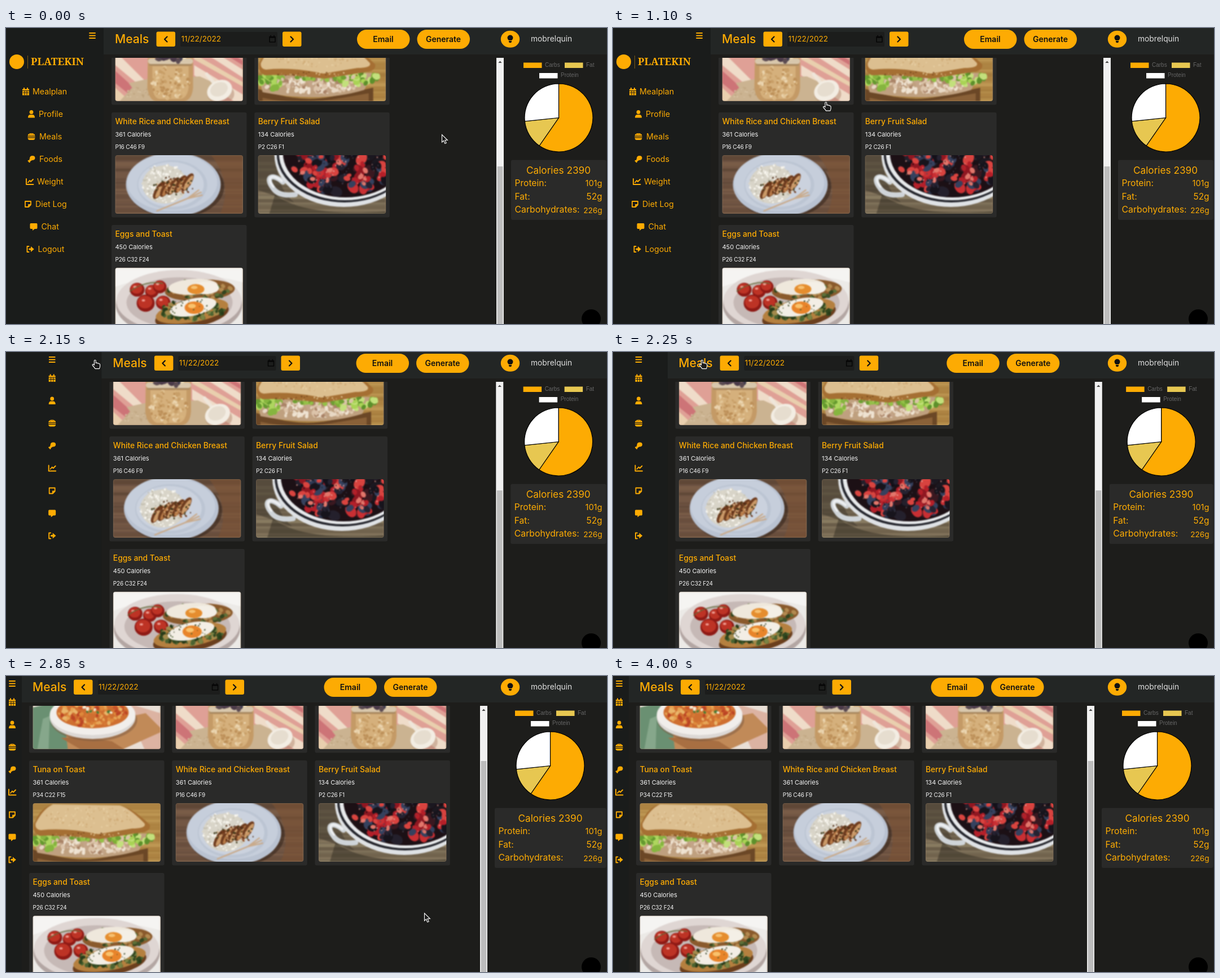
An HTML page that plays this animation: 1065x526 px, repeating every 4.45 s.

```html
<!DOCTYPE html>
<html lang="en">
<head>
<meta charset="utf-8">
<title>Meals</title>
<style>
html, body { margin: 0; width: 100%; height: 100%; overflow: hidden; background: #1d1d1b; }
svg { display: block; width: 1065px; height: 526px; font-family: Inter, "Open Sans", sans-serif; }
.gold { fill: #fdab03; }
.line { fill: none; stroke: #fdab03; stroke-width: 2; }
.bold { font-weight: 600; text-anchor: middle; }
.mid { font-weight: 500; }
.end { text-anchor: end; }
.key { font-family: "Liberation Sans", Arial, sans-serif; fill: #666; font-size: 10px; }
</style>
</head>
<body>
<svg id="stage" viewBox="0 0 1065 526"></svg>
<script>
const LOOP = 4450, STEP = 50;
const GOLD = '#fdab03';

// Markup helpers
let seed = 7;
const rnd = () => (seed = seed * 16807 % 2147483647) / 2147483647;
const rect = (x, y, w, h, fill, r = 0) =>
  `<rect x="${x}" y="${y}" width="${w}" height="${h}" rx="${r}" fill="${fill}"/>`;
const oval = (x, y, rx, ry, fill, more = '') =>
  `<ellipse cx="${x}" cy="${y}" rx="${rx}" ry="${ry}" fill="${fill}" ${more}/>`;
const path = (d, fill, more = '') => `<path d="${d}" fill="${fill}" ${more}/>`;
const stroke = (d, color, width) =>
  path(d, 'none', `stroke="${color}" stroke-width="${width}" stroke-linecap="round" stroke-linejoin="round"`);
const text = (x, y, size, str, cls = 'gold', more = '') =>
  `<text x="${x}" y="${y}" font-size="${size}" class="${cls}" ${more}>${str}</text>`;
const group = (id, body, more = '') => `<g id="${id}" ${more}>${body}</g>`;
const turn = (deg, x, y) => `transform="rotate(${deg} ${x} ${y})"`;

// Random blobs inside an ellipse
function scatter(n, x, y, rx, ry, size, colors) {
  let out = '';
  for (let i = 0; i < n; i++) {
    const a = rnd() * 6.283, d = Math.sqrt(rnd()), s = size * (0.7 + rnd() * 0.6);
    const px = (x + Math.cos(a) * d * rx).toFixed(1), py = (y + Math.sin(a) * d * ry).toFixed(1);
    out += oval(px, py, s.toFixed(1), (s * 0.75).toFixed(1), colors[Math.floor(rnd() * colors.length)],
      turn(Math.round(rnd() * 180), px, py));
  }
  return out;
}

function wood(base, colors) {
  let out = rect(0, 0, 226, 104, base);
  for (let y = 0; y < 104; y += 6)
    out += `<rect x="0" y="${y}" width="226" height="${(2 + rnd() * 5).toFixed(1)}" fill="${colors[Math.floor(rnd() * colors.length)]}" opacity=".5"/>`;
  return out;
}

// Dishes, each 226 x 104
const photos = {
  pasta: () => rect(0, 0, 226, 104, '#e9dfd6')
    + path('M0 30L40 20 75 104H0Z', '#6a9072') + path('M8 104L18 50 30 45 28 104Z', '#86a78b')
    + path('M160 20L226 40V104H198Z', '#dcb3a2')
    + path('M58 70L200 40 226 66V74L160 104H62Z', '#c18a58') + path('M50 84L90 82 140 90 162 104H84Z', '#a86f42')
    + oval(108, 52, 77, 38, '#7d5a40', 'opacity=".5"')
    + oval(106, 47, 76, 39, '#dcd8d5') + oval(106, 43, 76, 36, '#f1eeeb') + oval(106, 39, 64, 28, '#cf6f30')
    + scatter(150, 106, 38, 60, 25, 3.6, ['#de8a3c', '#c9562b', '#e6a455', '#bb4524', '#e9b56a', '#d67a35'])
    + scatter(8, 106, 36, 40, 10, 3, ['#4d7a35', '#f2e7cf']),

  oats: () => rect(0, 0, 226, 104, '#dfa096')
    + path('M0 15L60 75V90L0 40ZM150 0L226 48V62L130 0ZM140 40L226 92V104H210L140 58Z', '#efdcc9')
    + path('M0 50L50 95 40 104 0 72ZM175 0L226 32V40L160 0Z', '#cd7477')
    + path('M0 80L26 104H0ZM140 20L226 70V78L140 30Z', '#e9cfae')
    + path('M8 104L30 80 24 72 60 64 150 60 176 72 172 84 186 104Z', '#cbb391')
    + scatter(60, 60, 90, 45, 12, 1.5, ['#bda37e', '#d8c4a5'])
    + path('M58 20H138V80Q136 102 122 104H72Q60 102 57 80Z', '#c49a66')
    + path('M66 42H130V80Q128 98 116 100H78Q68 98 66 80Z', '#d5b07c')
    + scatter(110, 98, 72, 34, 30, 2.8, ['#e2c596', '#c89f68', '#d8b47f', '#bd9059', '#ebd5b0'])
    + rect(58, 28, 80, 10, '#d8c7ac', 5) + rect(60, 38, 76, 3, '#a98a62', 1)
    + scatter(14, 98, 28, 24, 5, 5, ['#3d3a4c', '#5b4b52', '#4a3a48', '#e0cfae'])
    + oval(187, 91, 24, 18, '#a87f67', 'opacity=".45"')
    + stroke('M180 78L162 56', '#efe6da', 6)
    + oval(185, 85, 23, 18, '#f3ede3', turn(-25, 185, 85)) + oval(184, 83, 16, 12, '#e6ddcf', turn(-25, 184, 83)),

  tuna: () => wood('#b38b49', ['#9a7034', '#c9a35f', '#a87c3d'])
    + path('M0 82Q70 108 130 96L204 80V104H0Z', '#6b4726')
    + path('M8 98Q70 112 150 98L196 90V104H8Z', '#8a6138')
    + path('M2 64Q60 50 204 54L188 84Q110 108 8 88Z', '#bfa07f')
    + scatter(130, 96, 76, 82, 13, 4, ['#e8d8c4', '#c3a488', '#dcc4aa', '#a98367', '#efe3d2'])
    + scatter(50, 178, 60, 36, 17, 6, ['#7fb036', '#a9d355', '#5d902b', '#c3e07c'])
    + scatter(30, 22, 68, 22, 14, 6, ['#86b53f', '#aed65f', '#659a2f'])
    + scatter(30, 100, 63, 75, 5, 4, ['#94c048', '#6f9f33', '#d9c3a6'])
    + path('M2 38Q12 10 32 3L156 5Q176 8 207 38 212 52 180 54L118 64Q50 56 12 58 0 54 2 38Z', '#a56f33')
    + path('M5 36Q18 10 36 2L154 4Q172 9 198 36 202 45 176 45L116 55Q58 43 14 48 3 46 5 36Z', '#dcbf90')
    + scatter(130, 105, 25, 82, 18, 1.6, ['#d0ac78', '#e8d1a6', '#cfaa76', '#e3c99c'])
    + scatter(34, 110, 56, 84, 4, 1.3, ['#e6cf9f', '#70431b', '#c3935a']),

  rice: () => wood('#6a5040', ['#56402f', '#7d5f48', '#684c38', '#87684f'])
    + path('M170 0H226V104H186Q210 50 170 0Z', '#7c5334', 'opacity=".6"')
    + oval(107, 56, 86, 56, '#2c1e17', 'opacity=".5"')
    + oval(103, 52, 84, 57, '#b9c2d1') + oval(101, 48, 80, 51, '#c6cedb') + oval(101, 53, 62, 44, '#bcc5d3')
    + oval(99, 52, 58, 40, '#cbd2de') + oval(88, 52, 40, 34, '#d8d4c8')
    + scatter(170, 87, 50, 40, 34, 2, ['#f3f1ea', '#dbd7ca', '#faf8f1', '#c5c1b3'])
    + [0, 1, 2, 3, 4].map(i => {
      const x = 78 + i * 12.5, y = 62 - i * 3.5;
      return oval(x, y, 7, 18, '#6f3d20', turn(32, x, y)) + oval(x + 2, y, 4, 15, i % 2 ? '#b87b48' : '#ca9967', turn(32, x, y));
    }).join('')
    + scatter(70, 104, 54, 36, 16, 1.8, ['#4d2813', '#8e4a20', '#3f3a1c', '#d8b083', '#6b3519'])
    + stroke('M74 99L128 77M128 77L148 62M128 77L152 66M128 77L154 71', '#c9ab8c', 2.6),

  berry: () => wood('#766953', ['#5f5341', '#8d7f65', '#6d5f49', '#988b6e'])
    + path('M0 0H36Q26 50 64 84L0 62Z', '#453d31', 'opacity=".6"')
    + path('M30 70Q80 110 226 100V104H20Z', '#2c261e', 'opacity=".45"')
    + stroke('M44 48C24 30 12 40 26 58Q36 74 66 70', '#cfd4d8', 9)
    + stroke('M42 46C24 31 14 40 27 56', '#eef0f2', 4)
    + oval(152, 0, 123, 92, '#dfe2e5') + oval(153, -2, 120, 86, '#23242b') + oval(154, -3, 117, 83, '#e8eaec')
    + oval(155, -4, 111, 79, '#1c1015')
    + scatter(90, 154, -2, 102, 68, 10, ['#1b1820', '#24202c', '#2f3a55', '#14111a', '#3a1820'])
    + scatter(46, 150, 16, 96, 50, 10, ['#b3202a', '#c92f33', '#8f1721', '#d8433f'])
    + scatter(26, 150, 32, 80, 36, 8, ['#17141c', '#252231', '#35415e'])
    + scatter(30, 146, 14, 86, 46, 5, ['#d9443f', '#e2766b', '#b51f28'])
    + scatter(90, 150, 16, 92, 48, 1.2, ['#e9a79c', '#4c4a58', '#08070b']),

  eggs: () => rect(0, 0, 226, 104, '#eceae7') + path('M0 0H226V26Q110 -6 0 34Z', '#f5f4f2')
    + oval(113, 66, 112, 58, '#b3a6a3') + oval(113, 59, 111, 55, '#dfd6d3') + oval(114, 62, 94, 45, '#c6b9b6')
    + oval(150, 40, 62, 19, '#8a5a2c', turn(-3, 150, 40)) + scatter(50, 150, 39, 56, 16, 4, ['#40532a', '#5e7038', '#b38a50', '#33451f'])
    + oval(138, 34, 44, 14, '#efe8dc', turn(-4, 138, 34)) + oval(160, 36, 24, 11, '#f4efe6')
    + oval(143, 38, 15, 9, '#e58d2e') + oval(140, 35, 6, 3, '#f6c070')
    + [[39, 39, 13], [65, 42, 12], [79, 34, 12], [85, 62, 13], [54, 63, 16]].map(([x, y, r]) =>
      oval(x, y, r, r * 0.95, '#8f1a15') + oval(x - 1, y - 2, r * 0.8, r * 0.7, '#bd3325') + oval(x - 4, y - 5, 3, 2, '#ee9a8f')).join('')
    + stroke('M26 42Q52 22 84 28', '#5f6b38', 1.5)
    + oval(136, 84, 66, 22, '#6b3f1d', turn(-10, 136, 84)) + oval(136, 77, 65, 20, '#b5803f', turn(-10, 136, 77))
    + scatter(100, 136, 76, 58, 17, 4.5, ['#31481f', '#4b6330', '#7b8444', '#273a18', '#a38a4c'])
    + oval(138, 70, 42, 15, '#f3eee5', turn(-12, 138, 70)) + oval(140, 71, 17, 11, '#e8842a') + oval(136, 68, 7, 4, '#f9c26c')
    + scatter(30, 138, 72, 50, 16, 1.2, ['#4a5f2c', '#2b3a1a'])
};

// Icons, centred on 0,0
const icons = [
  path('M-6 -4.5H6V-2H-6ZM-6 -1H6V6.5H-6ZM-4 -7H-2V-4H-4ZM2 -7H4V-4H2Z', GOLD) + stroke('M-5 2H5M-2 -1V6M2 -1V6', '#1a1c1b', 1),
  oval(0, -3.5, 3.4, 3.5, GOLD) + path('M-6 6.5Q-6 1 -2 1H2Q6 1 6 6.5Z', GOLD),
  path('M-6.5 -1.5Q-6 -6 0 -6T6.5 -1.5ZM-6.5 2.5H6.5Q6 6 3 6H-3Q-6 6 -6.5 2.5Z', GOLD)
    + stroke('M-6 .5H6', GOLD, 1.5) + stroke('M-3 -3.5H-2.8M0 -4.2H.2M3 -3.5H3.2', '#1a1c1b', 1),
  path('M-3 -1Q-3 -6 2 -6Q6.5 -6 6.5 -2Q6.5 2 1 2L-2 4Q-2 7 -4 6Q-5 5.5 -5 4.5Q-7 4.5 -6.3 2.5Q-5.5 1.5 -4 2Z', GOLD),
  stroke('M-6 -5V5H6.5M-3 1.5L0 -2 2 0 6 -4', GOLD, 1.9),
  stroke('M-5 -5H5V1L1 5H-5ZM5 1H1V5', GOLD, 1.8),
  path('M-5 -6H5Q6.5 -6 6.5 -4V2Q6.5 4 5 4H2L-2 7V4H-5Q-6.5 4 -6.5 2V-4Q-6.5 -6 -5 -6Z', GOLD),
  stroke('M-2.5 -5H-5.5V5H-2.5', GOLD, 1.9) + path('M-2.5 -1.5H1V-5L6.8 0 1 5V1.5H-2.5Z', GOLD)
];
const icon = (i, x, y) => `<g transform="translate(${x} ${y})">${icons[i]}</g>`;
const burger = (x, y) => `<path class="line" d="M${x - 5.7} ${y - 4.6}h11.4m-11.4 4.6h11.4m-11.4 4.6h11.4"/>`;

const nav = [['Mealplan', 35, 47], ['Profile', 45, 58], ['Meals', 45, 59], ['Foods', 45, 59],
  ['Weight', 42, 55], ['Diet Log', 39, 52], ['Chat', 49, 62.5], ['Logout', 43, 56.5]];

const meals = [
  ['pasta', 'Tomato Pasta', 420, 'P16 C60 F12'],
  ['oats', 'Overnight Oats', 320, 'P12 C48 F8'],
  ['oats', 'Overnight Oats', 320, 'P12 C48 F8'],
  ['tuna', 'Tuna on Toast', 361, 'P34 C22 F15'],
  ['rice', 'White Rice and Chicken Breast', 361, 'P16 C46 F9'],
  ['berry', 'Berry Fruit Salad', 134, 'P2 C26 F1'],
  ['eggs', 'Eggs and Toast', 450, 'P26 C32 F24']
];

const card = ([photo, name, kcal, macros], i) => group('card' + i,
  rect(0, 0, 239.5, 186.5, '#2a2a29', 3)
  + text(6.5, 21, 13.8, name, 'gold mid')
  + text(6.5, 43, 11, kcal + ' Calories', '', 'fill="#f4f4f4"')
  + text(6.5, 65, 10, macros, '', 'fill="#f4f4f4" letter-spacing="-.2"')
  + `<use href="#${photo}" x="6.5" y="76"/>`);

const arrowButton = (id, d) => group(id, rect(0, 6.5, 33.5, 26.5, GOLD, 3) + stroke(d, '#111', 2.2));
const pill = (id, label) => group(id, rect(0, 3, 93.5, 34, GOLD, 17) + text(46.5, 24.5, 14, label, 'bold', 'fill="#111"'));

// Pie slices run clockwise from the top
function pie(parts) {
  const total = parts.reduce((sum, p) => sum + p[0], 0);
  const at = f => `${(60.5 * Math.sin(f * 2 * Math.PI)).toFixed(2)} ${(159.5 - 60.5 * Math.cos(f * 2 * Math.PI)).toFixed(2)}`;
  let from = 0;
  return parts.map(([grams, fill]) => {
    const to = from + grams / total;
    const d = `M0 159.5L${at(from)}A60.5 60.5 0 ${to - from > 0.5 ? 1 : 0} 1 ${at(to)}Z`;
    from = to;
    return path(d, fill, 'stroke="#000" stroke-width="1.2"');
  }).join('');
}
const key = (x, y, fill, label) => rect(x, y, 32.5, 9.5, fill) + `<text class="key" x="${x + 38}" y="${y + 7.2}">${label}</text>`;

const defs = '<defs><clipPath id="frame"><rect width="226.5" height="104" rx="4"/></clipPath>'
  + '<clipPath id="view"><rect y="53" width="1065" height="473"/></clipPath>'
  + '<filter id="soft" filterUnits="userSpaceOnUse" x="-10" y="-10" width="246" height="124" color-interpolation-filters="sRGB">'
  + '<feGaussianBlur stdDeviation=".8"/></filter>'
  + Object.keys(photos).map(k => group(k,
    `<g filter="url(#soft)">${rect(-10, -10, 246, 124, '#8a745c')}${photos[k]()}</g>`, 'clip-path="url(#frame)"')).join('') + '</defs>';

const stage = document.getElementById('stage');
stage.innerHTML = defs + rect(0, 0, 1065, 526, '#1d1d1b') + rect(0, 0, 1065, 47, '#232625')
  + `<g clip-path="url(#view)">${meals.map(card).join('')}</g>`
  + group('bar', rect(0, 53, 13, 473, '#f1f1f1') + path('M3.4 62L6.5 58.6 9.6 62Z', '#444')
    + '<rect id="thumb" x="1.6" width="9.8" height="380" fill="#bdbdbd"/>')
  + group('title', text(0, 27, 21, 'Meals', 'gold mid'))
  + arrowButton('prev', 'M19 15.5L14.5 20 19 24.5') + arrowButton('next', 'M14.5 15.5L19 20 14.5 24.5')
  + '<rect id="dateBox" y="7" height="26" rx="2" fill="#1c1d1c"/>'
  + group('date', text(1, 24, 13.5, '11/22/2022'))
  + group('picker', stroke('M-5 15.5H5V25H-5ZM-3 13.5V15M3 13.5V15M-5 17H5', '#070707', 1.6))
  + pill('email', 'Email') + pill('generate', 'Generate')
  + oval(893.5, 19.8, 16.7, 15, GOLD)
  + path('M891 22Q888.5 19.5 888.5 17.5A5 5 0 0 1 898.5 17.5Q898.5 19.5 896 22ZM891 23H896V25Q893.5 27.5 891 25Z', '#111')
  + text(930, 24, 13.8, 'mobrelquin', '', 'fill="#dedede"')
  + group('chart', key(-62.5, 61.5, GOLD, 'Carbs') + key(10.5, 61.5, '#e7c751', 'Fat') + key(-34.5, 80, '#fff', 'Protein')
    + pie([[226, GOLD], [52, '#e7c751'], [101, '#fff']]))
  + '<rect id="sumBox" y="234.5" height="106.5" rx="3" fill="#2a2a29"/>'
  + group('sumTitle', text(0, 259, 17.2, 'Calories 2390', 'gold', 'text-anchor="middle"'))
  + group('sumRows', text(0, 281, 15.6, 'Protein:') + text(0, 305, 15.6, 'Fat:') + text(0, 328, 15.8, 'Carbohydrates:'))
  + text(1056.5, 281, 14.6, '101g', 'gold end') + text(1056.5, 305, 15.4, '52g', 'gold end') + text(1056.5, 329, 13.6, '226g', 'gold end')
  + oval(1037, 517, 17, 17, '#000')
  + '<rect id="side" height="526" fill="#1a1c1b"/><rect id="hover" fill="#2a2c2b"/>'
  + group('open', burger(153, 13.5) + oval(19, 60, 13, 13, GOLD) + rect(38, 49, 1, 23, '#7d5a13')
    + text(44, 66, 18, 'PLATEKIN', 'gold', 'style="font-family:\'Noto Serif\',serif;font-weight:800"')
    + nav.map(([label, ix, tx], i) => icon(i, ix, 113 + i * 40) + text(tx, 118 + i * 40, 14.2, label)).join(''))
  + group('slim', burger(0, 13.5) + nav.map((n, i) => icon(i, 0, 46.5 + i * 40)).join(''))
  + group('arrow', path('M.5 .5V14L3.6 11.2 5.8 16.4 8.2 15.4 6 10.3H10.4Z', '#1c1c1c', 'stroke="#fff" stroke-width="1.1"'))
  + group('hand', path('M-1.6 9V1.6Q-1.6 .2 -.2 .2T1.2 1.6V5.5Q3 4.6 3.8 6Q5.6 5.2 6.2 6.8Q8.4 6.2 8.6 8.4V11.5Q8.4 13.5 7.4 15.6H0Q-2 12.5 -4.6 10Q-5.4 8.6 -4.4 8Q-3.2 7.4 -1.6 9Z', '#1c1c1c', 'stroke="#fff" stroke-width="1.1"'));

const $ = {};
stage.querySelectorAll('[id]').forEach(el => $[el.id] = el);
const move = (el, x, y = 0) => el.setAttribute('transform', `translate(${x.toFixed(2)} ${y})`);
const show = (el, on) => el.setAttribute('visibility', on ? 'visible' : 'hidden');
const set = (el, attrs) => { for (const k in attrs) el.setAttribute(k, attrs[k]); };

// Pointer stops: time, x, y
const stops = [[0, 772, 189], [600, 772, 189], [700, 715, 196], [1000, 402, 192], [1100, 377.5, 131.5], [1150, 374, 122],
  [1400, 265, 74], [1600, 106, 30], [1700, 150.5, 18], [1800, 158, 14], [2250, 158, 14], [2350, 153, 38], [2600, 301, 161],
  [2850, 741, 421], [3350, 741, 421], [3600, 420, 235], [3850, 45, 26], [3900, 10, 46], [3950, 3, 18]];

function pointer(t) {
  const i = stops.findIndex(s => s[0] > t);
  if (i < 0) return stops[stops.length - 1].slice(1);
  const [t0, x0, y0] = stops[i - 1], [t1, x1, y1] = stops[i], k = (t - t0) / (t1 - t0);
  return [x0 + (x1 - x0) * k, y0 + (y1 - y0) * k];
}

function render(t) {
  const folded = t >= 2100;
  const p = Math.min(1, Math.max(0, (t - 2145) / 200));
  const mix = (a, b) => a + (b - a) * p;
  const cols = p > 0.55 ? 3 : 2, first = cols === 3 ? 0 : 2;
  const left = mix(187, 41), bar = mix(869, 840), sum = mix(895, 866), width = mix(173, 28);

  meals.forEach((m, i) => {
    const n = i - first;
    show($['card' + i], n >= 0);
    move($['card' + i], left + (n % cols) * 253.2, -50 + Math.floor(n / cols) * 200);
  });
  move($.bar, bar);
  set($.thumb, { y: cols === 3 ? 151 : 246 });
  move($.title, mix(193, 47));
  move($.prev, mix(266.5, 120));
  move($.next, mix(490, 388.5));
  move($.date, mix(309.5, 163));
  set($.dateBox, { x: mix(309, 163), width: mix(172, 216) });
  move($.picker, mix(472, 370.5));
  move($.email, mix(622, 563.5));
  move($.generate, mix(728.5, 670));
  move($.chart, mix(979.5, 964.5));
  set($.sumBox, { x: sum, width: 1063.5 - sum });
  move($.sumTitle, mix(979, 964.5));
  move($.sumRows, sum + 6.5);
  set($.side, { width });
  show($.open, !folded);
  show($.slim, folded);
  move($.slim, width / 2 - 3);

  const [x, y] = pointer(t), seen = t < 4000;
  let hot = null;
  if (!folded && x > 140 && x < 173 && y < 27) hot = [140, 0, 33, 27];
  else if (p === 1 && x < 28 && y < 346) hot = y < 27 ? [0, 0, 28, 27] : [0, 27 + Math.floor((y - 27) / 40) * 40, 28, 40];
  show($.hover, hot && seen);
  if (hot) set($.hover, { x: hot[0], y: hot[1], width: hot[2], height: hot[3] });

  const cx = x - left, cy = y + 50;
  const onCard = y > 53 && cx > 0 && cx < cols * 253 && cx % 253.2 < 239.5 && cy % 200 < 186.5
    && (y < 350 || cx < 239.5);
  const hand = hot || onCard || (folded && t < 2300);
  show($.hand, seen && hand);
  show($.arrow, seen && !hand);
  move($.hand, x, y);
  move($.arrow, x, y);
}

const start = performance.now();
function tick(now) {
  const t = Math.max(0, now - start) % LOOP;
  render(Math.floor(t / STEP) * STEP);
  requestAnimationFrame(tick);
}
render(0);
requestAnimationFrame(tick);
</script>
</body>
</html>
```
